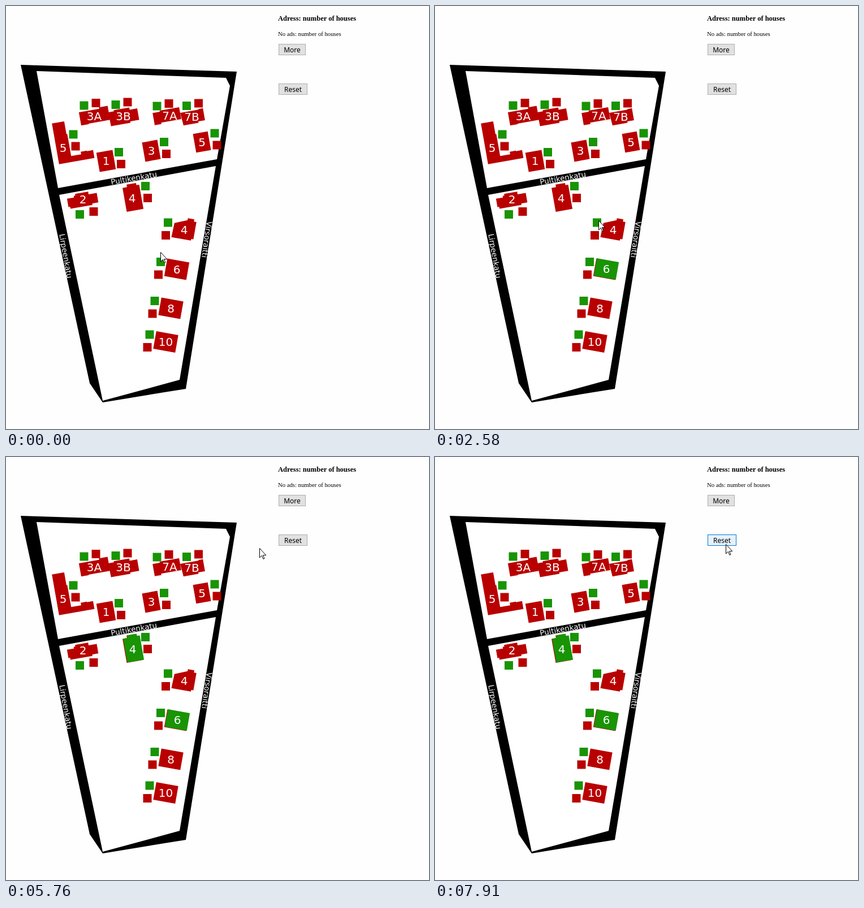
Animation of 748 by 748 pixels, one loop 8000 ms. Source, as an HTML page:

```html
<!DOCTYPE html>
<html lang="en">
<head>
<meta charset="utf-8">
<title>House map</title>
<style>
  html, body { margin: 0; width: 100%; height: 100%; overflow: hidden; background: #fefefe; }
  svg { display: block; width: 100%; height: 100%; }
  #map text { font: 20px "DejaVu Sans", sans-serif; fill: #fff; text-anchor: middle; }
  #map .street { font-size: 13.4px; }
  .red { fill: #b90000; }
  .green { fill: #189404; }
  .panel { font: 9.7px "Liberation Serif", serif; }
  .panel .title { font-size: 12.5px; font-weight: bold; }
  .panel .summary { font-size: 10.7px; }
  .underlined { text-decoration: underline; }
  .button rect { fill: #e1e1e1; stroke: #adadad; }
  .button.hover rect { fill: #e5f1fb; stroke: #0078d7; }
  .button text { font: 12px "Noto Sans", sans-serif; text-anchor: middle; }
</style>
</head>
<body>
<svg viewBox="0 0 748 748">
  <g id="map">
    <path d="M26 104 408 116 318 677 280 683 171 701 148 667Z"/>
    <path fill="#fff" d="M54 115 389 127 396 141 373 271 92 322ZM94 334 371 283 307 661 171 698Z"/>
    <text class="street" transform="translate(226 304) rotate(-10)" y="5">Pultikenkatu</text>
    <text class="street" transform="translate(106 442) rotate(80)" y="5">Lirpeenkatu</text>
    <text class="street" transform="translate(355.5 413) rotate(98)" y="5">Virsoraitti</text>
  </g>
  <g class="panel" id="collapsed">
    <text class="title" x="481" y="26">Adress: number of houses</text>
    <text class="summary" x="481" y="52.5">No ads: number of houses</text>
  </g>
  <g class="panel" id="expanded">
    <text class="title underlined" x="481" y="24" style="font-size:11.5px">Address</text>
  </g>
  <path id="cursor" fill="#fff" stroke="#000" d="M.5.5v16.5l3.8-3.6 2.6 6 2.1-.9-2.5-5.8h5.3z"/>
</svg>
<script>
const DURATION = 8000, FRAME = 135;
const $ = id => document.getElementById(id);

function add(parent, tag, attributes, text = '') {
  const node = document.createElementNS('http://www.w3.org/2000/svg', tag);
  for (const name in attributes) node.setAttribute(name, attributes[name]);
  node.textContent = text;
  return parent.appendChild(node);
}

const rect = (w, h) => `M${-w / 2} ${-h / 2}h${w}v${h}h${-w}z`;

// Tilt of the house, and offsets of its green marker and of the red one from the green
const above = { tilt: -10, green: [-18, -19], red: [21, -4.5] };
const right = { tilt: -10, green: [22.5, -15.5], red: [4, 21] };
const left = { tilt: 10, green: [-28.5, -13], red: [-4, 22.5] };

const switching = [];
function house(label, x, y, shape, { tilt, green, red }, toggles) {
  const building = add($('map'), 'g', { transform: `translate(${x} ${y})` });
  const wall = { d: shape, transform: `rotate(${tilt})` };
  add(building, 'path', { ...wall, class: 'red' });
  const top = add(building, 'g', {});
  const cover = add(top, 'path', { ...wall, class: 'green', display: 'none' });
  add(top, 'text', { y: 7 }, label);
  if (toggles) switching.push({ top, cover, toggles });

  const marker = (color, mx, my) =>
    add(building, 'path', { class: color, d: rect(15, 15), transform: `translate(${mx} ${my})` });
  marker('green', ...green);
  marker('red', green[0] + red[0], green[1] + red[1]);
}

house('3A', 156, 195, 'M-25.5-11.5h36.5v-2.5h15.5v25h-38.5v1h-13.5z', above);
house('3B', 207.5, 195, 'M-25-11.5h10v-2h28v4h13.5v20.5h-16v2.5h-35z', { ...above, green: [-13.5, -20.5] });
house('7A', 289.5, 194, 'M-29-10h13v-2h35v21.5h-36v2.5h-12z', { ...above, green: [-22.5, -17] });
house('7B', 328.5, 196, 'M-19-10.5h33v-1h8v21.5h-12v2.5h-27z', { ...above, green: [-9, -19.5] });
house('5', 101, 251, 'M-12-46h22v23h1.5v39.5h18v-4.5h11v1h11v14h-63.5z', { ...right, green: [18, -24] });
house('1', 177, 274, rect(29, 34.5), right);
house('3', 257, 256, rect(27.5, 34.5), right);
house('5', 346.5, 240.5, rect(26.5, 33.5), right);
house('2', 136, 342, 'M-27.5-6h12.5v-3h3v-3h23.5v5h14.5v17h-11v2.5h-39.5v-3.5h-3z',
  { tilt: -10, green: [-5.5, 26.5], red: [24.5, -5] });
house('4', 223, 340, 'M-13.5-21h8v-4.5h17v4h5v43.5h-30z', { ...right, green: [23.5, -21.5] }, [3410]);
house('4', 315, 396, 'M-19-9 3-18v-3.5h11.5v4h4.5v31h-4v3h-35z', left, [2730, 4430]);
house('6', 302, 465.5, rect(39.5, 31.5), left, [444, 1300, 1860]);
house('8', 291.5, 534.5, rect(39.5, 31.5), left);
house('10', 282.5, 594, rect(39.5, 31.5), left);

const ranks = ['1st: x', '2nd: x', '3rd: x', '4th: x', '5th: x'];
['No ads(number):', ...ranks, 'Ads(number):', ...ranks].forEach((text, i) =>
  add($('expanded'), 'text', {
    x: 481, y: 48.3 + 21.43 * i, class: text.endsWith('x') ? '' : 'underlined'
  }, text));

function addButton(panel, text, y, width) {
  const group = add($(panel), 'g', { class: 'button' });
  add(group, 'rect', { x: 482.5, y, width, height: 19 });
  add(group, 'text', { x: 482.5 + width / 2, y: y + 14 }, text);
  return { group, y, width };
}
const buttons = [
  addButton('collapsed', 'More', 67.5, 47),
  addButton('collapsed', 'Reset', 137.5, 50),
  addButton('expanded', 'Less', 297.5, 43),
  addButton('expanded', 'Reset', 368.5, 50)
];

// Cursor moves: time of the first and last step, end point
const moves = [
  [160, 870, 274, 471], [1300, 1700, 275, 459], [1860, 2330, 288, 394], [2460, 2580, 289, 379],
  [2730, 3410, 246, 316], [3540, 3680, 319, 377], [3800, 3930, 349, 392], [4050, 4560, 277, 411],
  [4700, 5110, 281, 410], [5250, 6150, 503, 78], [6550, 6680, 512, 336], [6810, 6940, 508, 306],
  [7230, 7910, 514, 154]
];

// The cursor eases out towards each end point, one visible step per FRAME
function cursorAt(time) {
  let x = 273, y = 435;
  for (const [start, end, toX, toY] of moves) {
    if (time < start) break;
    const gaps = Math.round((end - start) / FRAME);
    const step = Math.floor((time - start) / (end - start) * gaps + 1e-6) + 1;
    const rest = 1 - Math.min(1, step / (gaps + 1));
    const eased = 1 - rest * rest;
    x += (toX - x) * eased;
    y += (toY - y) * eased;
  }
  return [Math.round(x), Math.round(y)];
}

function render(time) {
  const [x, y] = cursorAt(time);
  $('cursor').setAttribute('transform', `translate(${x} ${y})`);

  for (const { top, cover, toggles } of switching) {
    const isGreen = toggles.filter(at => time >= at).length % 2 === 1;
    cover.setAttribute('display', isGreen ? 'inline' : 'none');
    top.setAttribute('transform', isGreen ? 'translate(1 -.5)' : '');
  }

  const isOpen = time >= 6020 && time < 7230;
  $('expanded').style.display = isOpen ? '' : 'none';
  $('collapsed').style.display = isOpen ? 'none' : '';
  for (const { group, y: top, width } of buttons) {
    const inside = x >= 482 && x <= 483 + width && y >= top && y <= top + 19;
    group.classList.toggle('hover', inside);
  }
}

const startTime = performance.now();
function tick() {
  render((performance.now() - startTime) % DURATION);
  requestAnimationFrame(tick);
}
tick();
</script>
</body>
</html>
```
